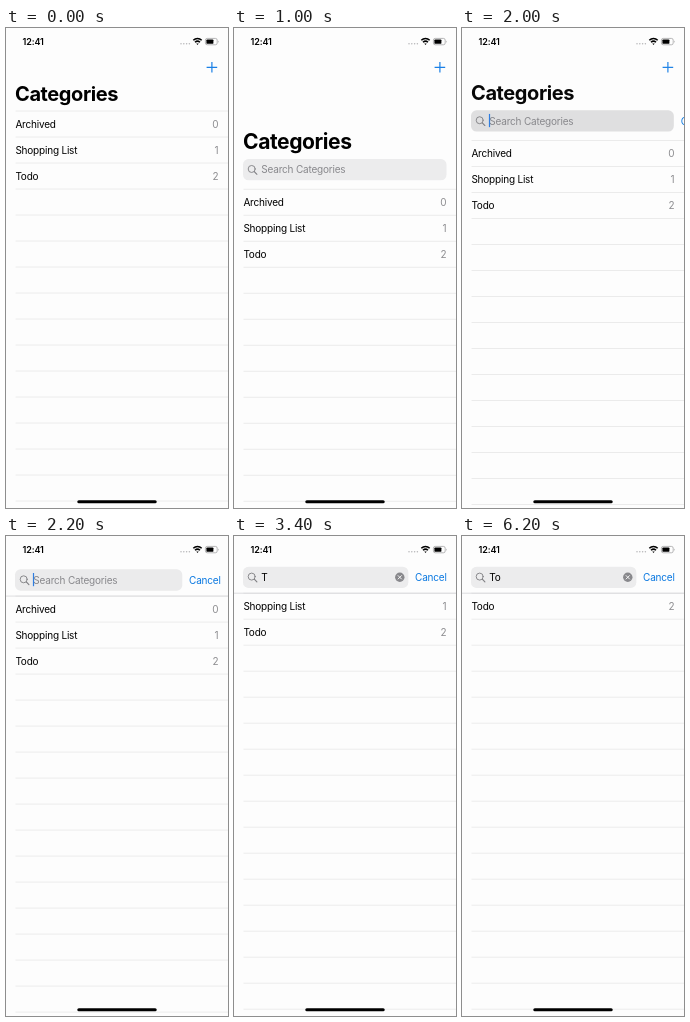
Write an HTML page that moves like this. It is 222x480 px and loops after 8000 ms.

```html
<!DOCTYPE html>
<html lang="en">
<head>
<meta charset="utf-8">
<title>Category search</title>
<style>
html, body { margin: 0; width: 100%; height: 100%; overflow: hidden; background: #fdfdfd; }
svg { display: block; width: 100vw; height: 100vh; }
text { font: 10px Inter, "Liberation Sans", sans-serif; letter-spacing: -.2px; white-space: pre; }
.title { font-size: 20px; font-weight: 700; letter-spacing: -.4px; }
.clock { font-size: 9px; font-weight: 600; letter-spacing: -.15px; }
.count { fill: #8c8c8f; text-anchor: end; }
.hint { fill: #88888c; }
.blue { fill: #0a78e0; }
.rule { stroke: #e7e7e8; stroke-width: .8; }
</style>
</head>
<body>
<svg viewBox="0 0 222 480">
  <rect width="222" height="480" fill="#fdfdfd"/>
  <g id="rules"></g>
  <path id="edge" class="rule" d="M0 57.2H222" style="stroke:#d5d5d7"/>
  <g id="rows"></g>
  <text id="title" class="title" x="9">Categories</text>
  <path id="plus" d="M200.6 39.3h10.6M205.9 34v10.6" stroke="#1a80e6" stroke-width="1.2"/>

  <g id="search">
    <rect id="field" x="9" width="203.5" rx="5.5"/>
    <g id="inside">
      <g fill="none" stroke="#7f7f83" stroke-linecap="round">
        <circle cx="17.7" cy="-.7" r="3.5" stroke-width=".9"/>
        <path d="M20.3 1.9l2.6 2.7" stroke-width="1.1"/>
      </g>
      <text id="query" x="27.3" y="3.6"></text>
      <rect id="caret" y="-7" width="1.2" height="13.2" fill="#2f7de0"/>
      <g id="clear">
        <circle cx="165.8" r="4.7" fill="#88888c"/>
        <path d="M164.1-1.7l3.4 3.4m0-3.4l-3.4 3.4" stroke="#fff" stroke-width=".9" stroke-linecap="round"/>
      </g>
    </g>
    <text id="cancel" class="blue" y="3.6">Cancel</text>
  </g>

  <text class="clock" x="16.6" y="16.8">12:41</text>
  <g id="dots" fill="#b5b5b7"></g>
  <g fill="none" stroke="#000" stroke-width="1.5">
    <path d="M187.3 12.3a6 6 0 0 1 8.4 0M189 14.3a3.6 3.6 0 0 1 5 0"/>
    <path d="M190.3 15.5h2.4l-1.2 1.5z" fill="#000" stroke="none"/>
  </g>
  <rect x="199.4" y="10.4" width="11.8" height="6.4" rx="1.8" fill="none" stroke="#98989a" stroke-width=".7"/>
  <rect x="200.4" y="11.4" width="7" height="4.4" rx=".9"/>
  <path d="M212 12.4q1.3 1.2 0 2.4z" fill="#98989a"/>
  <rect x="71.3" y="472.2" width="79.4" height="3" rx="1.5"/>
</svg>
<script>
const LOOP = 8000, STEP = 100, ROW = 26;
const CLOSED = 83, OPEN = 113.5, PINNED = 57.2, PULL = 57;
const ITEMS = [["Archived", 0], ["Shopping List", 1], ["Todo", 2]];

const $ = id => document.getElementById(id);
const set = (id, attrs) => { for (const k in attrs) $(id).setAttribute(k, attrs[k]); };
const add = (parent, tag, attrs, text = "") => {
  const el = document.createElementNS("http://www.w3.org/2000/svg", tag);
  for (const k in attrs) el.setAttribute(k, attrs[k]);
  el.textContent = text;
  return parent.appendChild(el);
};
const clamp = x => Math.min(1, Math.max(0, x));
const ramp = (t, from, to) => clamp((t - from) / (to - from));
const smooth = x => x * x * (3 - 2 * x);
const mix = (a, b, p) => a + (b - a) * p;

for (let i = 0; i < 19; i++)
  add($("rules"), "path", { class: "rule", d: `M9.5 ${i * ROW}H222` });
for (let i = 0; i < 4; i++)
  add($("dots"), "circle", { cx: 175 + i * 2.8, cy: 15.8, r: .75 });
const rows = ITEMS.map(([name, count]) => {
  const g = add($("rows"), "g", {});
  add(g, "text", { x: 9.4, y: 16.6 }, name);
  add(g, "text", { x: 212.3, y: 16.6, class: "count" }, count);
  return g;
});

// Top of the list while it is pulled down and springs back
function pulledTop(t) {
  if (t < 945) return mix(CLOSED, OPEN + PULL, smooth(ramp(t, 730, 900)));
  if (t >= 1600) return OPEN;
  const k = 13 * (t - 945) / 1000;
  return OPEN + PULL * (1 + k) * Math.exp(-k);
}

function caretAlpha(t) {
  if (t < 2000) return 0;
  if (t < 3000) return 1 - ramp(t, 2400, 2700);
  if (t < 3400) return 1;
  if (t < 6200) return ramp(t, 5200, 5600);
  return 0;
}

function draw(t) {
  const pin = smooth(ramp(t, 1980, 2235));
  const pulled = pulledTop(t);
  const top = mix(pulled, PINNED, pin);
  const reveal = clamp((pulled - CLOSED) / (OPEN - CLOSED));
  const over = Math.max(0, pulled - OPEN);
  const fade = clamp(1 - 2 * pin);

  set("rules", { transform: `translate(0 ${top})` });
  set("edge", { transform: `translate(0 ${top - PINNED})`, opacity: pin });
  set("title", {
    transform: `translate(9 ${73.2 + over - (OPEN - top) * (pin > 0)}) scale(${1 + over * .0011}) translate(-9 0)`,
    opacity: fade
  });
  set("plus", { opacity: fade });

  const filter = t < 3400 ? "" : t < 6200 ? "t" : "to";
  let line = 0;
  ITEMS.forEach(([name], i) => {
    const hit = name.toLowerCase().includes(filter);
    rows[i].style.display = hit ? "" : "none";
    if (hit) rows[i].setAttribute("transform", `translate(0 ${top + ROW * line++})`);
  });

  const height = 21.3 * reveal;
  const right = mix(212.5, 174.3, pin);
  const shade = Math.round(t >= 1900 ? mix(223, 236, pin) : 236);
  set("search", {
    transform: `translate(0 ${top - mix(9 + height / 2, 15.9, pin)})`,
    opacity: reveal > 0 ? 1 : 0
  });
  set("field", { y: -height / 2, height, width: right - 9, fill: `rgb(${shade},${shade},${shade + 1})` });
  set("inside", { opacity: clamp(reveal * 2 - 1) });
  set("cancel", { x: right + 6.8, opacity: pin > 0 ? 1 : 0 });

  const typed = t < 3000 ? "" : t < 5800 ? "T" : "To";
  const query = $("query");
  query.textContent = typed || "Search Categories";
  query.setAttribute("class", typed ? "" : "hint");
  set("clear", { opacity: typed ? 1 : 0 });
  set("caret", {
    x: 26.9 + (typed ? query.getComputedTextLength() + .5 : 0),
    opacity: caretAlpha(t)
  });
}

const start = performance.now();
function tick() {
  const t = (performance.now() - start) % LOOP;
  draw(Math.floor(t / STEP) * STEP);
  requestAnimationFrame(tick);
}
draw(0);
requestAnimationFrame(tick);
</script>
</body>
</html>
```
